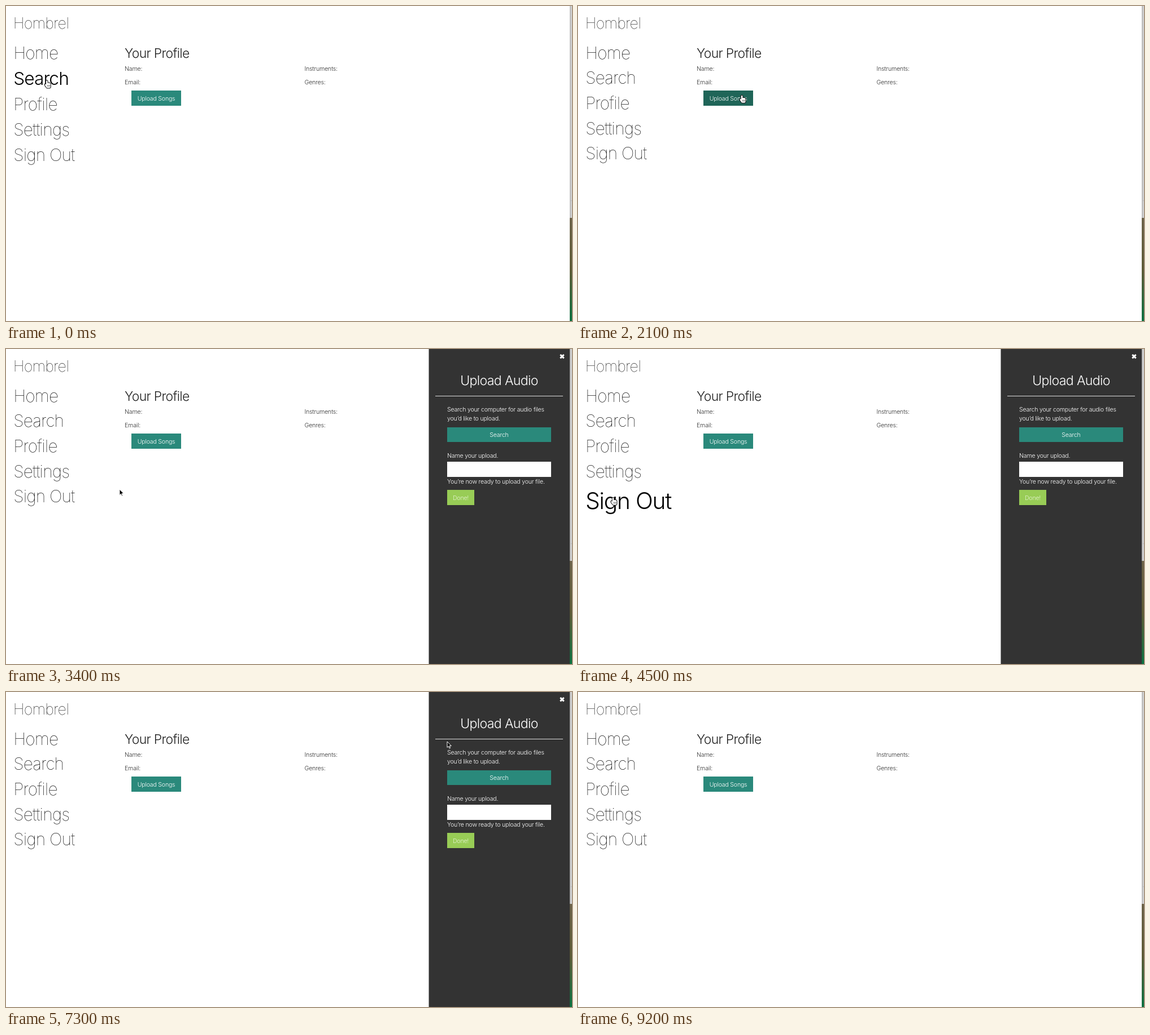
An HTML page with a canvas that plays this animation: 1002 px wide and 559 px high, repeating every 9.8 s.

```html
<!DOCTYPE html>
<html lang="en">
<head>
<meta charset="utf-8">
<title>Profile page</title>
<style>
  html, body { margin: 0; width: 100%; height: 100%; overflow: hidden; background: #fff; }
  canvas { display: block; width: 1002px; height: 559px; }
</style>
</head>
<body>
<canvas id="stage" width="1002" height="559"></canvas>
<script>
const ctx = document.getElementById('stage').getContext('2d');
const W = 1002, H = 559, LOOP = 9800, TICK = 100;
const TEAL = '#2a897b', TEAL_DARK = '#1f6558', LIME = '#98cc56', INK = '#333';
const NAV = ['Home', 'Search', 'Profile', 'Settings', 'Sign Out'];
const NAV_TOP = 60.5, ROW = 44.67, ROW_GROW = 15, GROW_MS = 250;
const START = -40, CURSOR_GONE = 9200;

// Pointer stops: arrival time, x, y, rest
const STOPS = [
  [START, 73, 122], [800, 62, 264, 200], [2100, 290, 159, 500], [2900, 308, 264],
  [3400, 201, 249, 100], [4500, 62, 264], [5100, 60, 182], [5600, 60, 223, 400],
  [6800, 488, 92, 100], [7300, 781, 88], [7500, 940, 208, 100], [8200, 983, 13, 400],
  [9100, 590, 168]
];

const clamp = v => Math.min(1, Math.max(0, v));
const swing = (t, start) => 0.5 - Math.cos(Math.PI * clamp((t - start) / 245)) / 2;
const panelAlpha = t => swing(t, 2400) - swing(t, 8300);
const inside = (p, x, y, w, h) => p.x >= x && p.x < x + w && p.y >= y && p.y < y + h;

function pointer(t) {
  const found = STOPS.findIndex(s => s[0] >= t);
  const i = found < 0 ? STOPS.length - 1 : Math.max(1, found);
  const [left, x0, y0, rest = 0] = STOPS[i - 1];
  const [arrive, x1, y1] = STOPS[i];
  const p = clamp((t - left - rest) / (arrive - left - rest));
  const eased = Math.sin(p * Math.PI / 2);
  return { x: x0 + (x1 - x0) * eased, y: y0 + (y1 - y0) * eased };
}

function navRows(grow) {
  let top = NAV_TOP;
  return grow.map(g => {
    const row = { top, h: ROW + ROW_GROW * g };
    top += row.h;
    return row;
  });
}

// Menu growth follows from the pointer's history, stored once per tick.
const states = [];
{
  const grow = NAV.map(() => 0), step = 10;
  for (let t = START; t < LOOP; t += step) {
    const p = pointer(t);
    const hit = navRows(grow).findIndex(r => inside(p, 12, r.top, 125, r.h));
    if (t >= 0 && t % TICK === 0) states.push({ p, hit, grow: grow.slice() });
    grow.forEach((g, i) => { grow[i] = clamp(g + (i === hit ? step : -step) / GROW_MS); });
  }
}

function text(s, x, y, size, weight, color, align = 'left', track = -0.03) {
  ctx.font = `${weight} ${size}px Inter, Roboto, sans-serif`;
  ctx.letterSpacing = track * size + 'px';
  ctx.textAlign = align;
  ctx.fillStyle = color;
  ctx.fillText(s, x, y);
}
const small = (s, x, y, color = INK, align = 'left') => text(s, x, y, 10.6, 300, color, align, -0.02);

function box(x, y, w, h, fill) {
  ctx.fillStyle = fill;
  ctx.fillRect(x, y, w, h);
}

function button(label, x, y, w, h, fill, color = '#fff') {
  box(x, y, w, h, fill);
  small(label, x + w / 2, y + h / 2 + 4.2, color, 'center');
}

function gradient(x0, y0, x1, y1, ...colors) {
  const g = ctx.createLinearGradient(x0, y0, x1, y1);
  colors.forEach((c, i) => g.addColorStop(i / (colors.length - 1), c));
  return g;
}

function desktopEdge() {
  box(998, 0, 4, H, gradient(998, 0, W, 0, '#b4b4b4', '#d8d8d8'));
  box(998, 345, 4, 1, '#bbb');
  box(998, 376, 4, H - 376, gradient(0, 376, 0, H, '#6c6248', '#5d5a35', '#0b7040'));
}

function menu({ grow, hit }) {
  text('Hombrel', 12.8, 40.3, 27, 100, '#111');
  navRows(grow).forEach((row, i) => {
    const size = 30 + 10.6 * grow[i];
    const y = row.top + row.h / 2 + size * 0.3635;
    text(NAV[i], 13.2, y, size, i === hit ? 300 : 100, '#000');
  });
}

function profile(hot) {
  text('Your Profile', 210, 92, 22.9, 300, '#222');
  small('Name:', 210, 115);
  small('Email:', 210, 138.8);
  small('Instruments:', 528.5, 115);
  small('Genres:', 528.5, 138.8);
  button('Upload Songs', 222, 150, 88, 27, hot ? TEAL_DARK : TEAL);
}

function panel(alpha) {
  if (alpha <= 0) return;
  box(748.5, 0, 249.5, H, '#333');
  ctx.strokeStyle = '#fff';
  ctx.lineWidth = 3;
  ctx.beginPath();
  for (const side of [-3.2, 3.2]) {
    ctx.moveTo(984.5 - side, 10);
    ctx.lineTo(984.5 + side, 16.4);
  }
  ctx.stroke();
  text('Upload Audio', 873, 64, 23.2, 300, '#fff', 'center');
  box(760, 83, 226, 1, '#ddd');
  small('Search your computer for audio files', 781, 111.3, '#fff');
  small('you’d like to upload.', 781, 127.2, '#fff');
  button('Search', 781, 139, 184, 26, TEAL);
  small('Name your upload.', 781, 192.8, '#fff');
  box(781, 200, 184, 27, '#fff');
  small('You’re now ready to upload your file.', 781, 239.2, '#fff');
  button('Done!', 781, 250, 48, 27, LIME, '#e6f4d2');
  // The page behind is white, so a white veil fades the whole panel as one.
  box(748.5, 0, 249.5, H, `rgba(255, 255, 255, ${1 - alpha})`);
}

function hand() {
  const shape = new Path2D();
  shape.roundRect(-1.2, -0.3, 2.6, 9, 1.3);
  shape.roundRect(-1.2, 4, 7.8, 8.8, 2.5);
  shape.ellipse(-1.5, 8.5, 1.3, 3, -0.6, 0, 7);
  ctx.lineWidth = 2;
  ctx.strokeStyle = '#111';
  ctx.stroke(shape);
  ctx.fillStyle = '#fff';
  ctx.fill(shape);
  for (const x of [1, 2.9, 4.8]) box(x, 7.5, 0.6, 3, '#111');
}

function arrow() {
  const shape = new Path2D('M0 0V10.4L2.4 8.2L4 12L5.6 11.3L4 7.6H7.3Z');
  ctx.fillStyle = '#000';
  ctx.strokeStyle = '#fff';
  ctx.lineWidth = 1;
  ctx.fill(shape);
  ctx.stroke(shape);
}

function draw(now) {
  const t = Math.floor((now % LOOP) / TICK) * TICK;
  const state = states[t / TICK], { p, hit } = state;
  const alpha = panelAlpha(t);
  const onUpload = inside(p, 222, 150, 88, 27);
  const onClose = alpha > 0 && inside(p, 976, 4, 18, 18);

  box(0, 0, W, H, '#fff');
  desktopEdge();
  menu(state);
  profile(onUpload);
  panel(alpha);
  if (t >= CURSOR_GONE) return;
  ctx.save();
  ctx.translate(p.x, p.y);
  if (hit >= 0 || onUpload || onClose) hand();
  else arrow();
  ctx.restore();
}

const begin = performance.now();
function loop() {
  draw(performance.now() - begin);
  requestAnimationFrame(loop);
}
loop();
</script>
</body>
</html>
```
